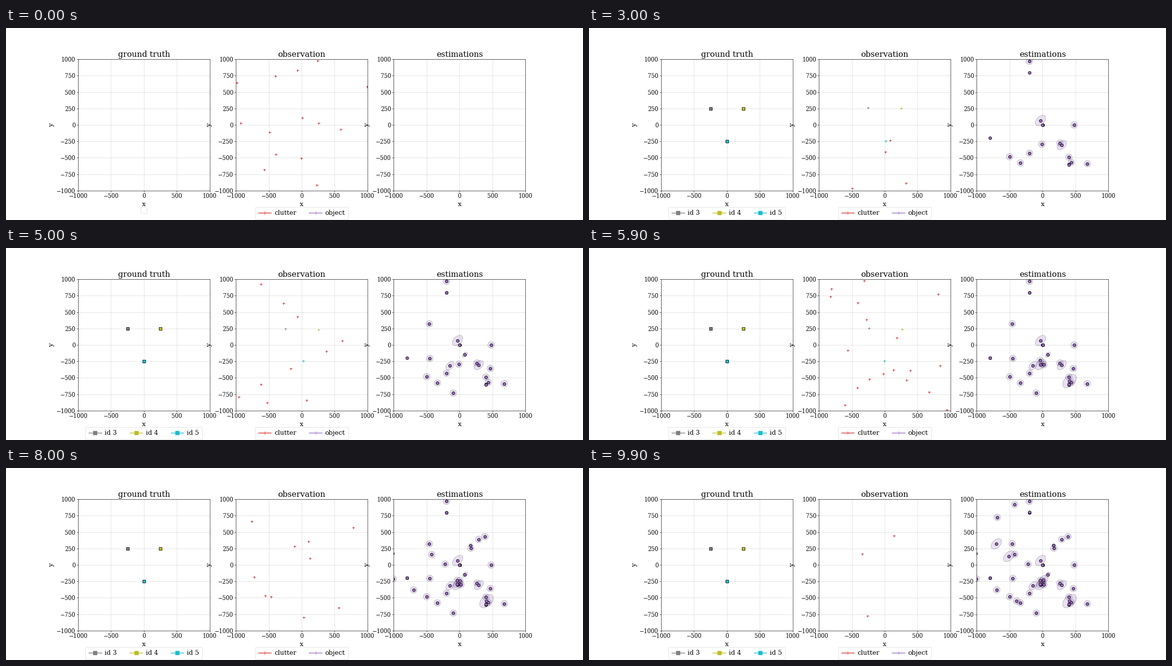
Write a matplotlib script that moves like this. It is 1200 by 400 pixels and loops after 10 s.

```python
import numpy as np
import matplotlib.pyplot as plt
from matplotlib.animation import FuncAnimation
from matplotlib.lines import Line2D
from matplotlib.patches import Ellipse

STEPS = 100
BORN, LOST = 1, 70          # first step with objects, first step without detections
RED, PURPLE = "#d62728", "#9467bd"
OBJECTS = [("id 3", "#7f7f7f", (-250, 250)),
           ("id 4", "#bcbd22", (250, 250)),
           ("id 5", "#17becf", (0, -250))]

# Estimates in order of arrival: equal circles, then ellipses tilted by
# 45 degrees with the length of their long axis.
ROUND = [(-200, 970), (265, -275), (400, -490), (437, -570), (680, -590),
         (-10, -293), (-198, -430), (480, 0), (-500, -483), (-337, -578),
         (-95, -732),
         (-460, 322), (-452, -205), (468, -358), (-35, -235), (20, -300),
         (172, 255), (290, 390), (388, 433), (-423, 160), (-220, 14),
         (-697, -380), (-1008, -212), (5, -240),
         (-423, 920), (-688, 725), (-395, -548)]
TILTED = [(-30, 68, 190), (293, -307, 170),
          (82, -148, 95), (-145, -316, 155), (-30, -300, 190), (410, -550, 250),
          (-35, -290, 130), (-703, 322, 190), (-512, 132, 200), (15, -225, 170)]
# Sharp estimates that keep coming back: first step, x, y.
SHARP = [(1, 0, 0), (2, 400, -600), (21, -200, 800), (26, -800, -200),
         (61, 168, 300), (74, -1017, 175)]

plt.rcParams.update({
    "font.family": "DejaVu Serif", "font.size": 10,
    "axes.titlesize": 12, "axes.titlepad": 4,
    "axes.labelsize": 9.6, "axes.labelpad": 3,
    "xtick.labelsize": 8.4, "ytick.labelsize": 8.4,
    "axes.linewidth": 0.5, "patch.linewidth": 0.5, "legend.fontsize": 9.6,
    "legend.borderpad": 0.5, "legend.handletextpad": 0.5,
})

rng = np.random.default_rng(7)


def observe():
    clutter = rng.uniform(-1000, 1000, (rng.poisson(11), 2))
    found = [rng.normal(pos, 10) for _, _, pos in OBJECTS]
    return clutter, found


scans = [observe() for _ in range(STEPS)]

fig, axes = plt.subplots(1, 3, figsize=(12, 4), dpi=100)
truth_ax, scan_ax, est_ax = axes
for ax, title in zip(axes, ("ground truth", "observation", "estimations")):
    ax.set(title=title, xlabel="x", ylabel="y", aspect="equal",
           xlim=(-1000, 1000), ylim=(-1000, 1000))
    ax.set_xticks(range(-1000, 1001, 500))
    ax.set_yticks(range(-1000, 1001, 250))
    ax.tick_params(length=2, width=0.5, pad=2)
    ax.grid(color="#b0b0b0", lw=0.5, alpha=0.5)
    ax.set_axisbelow(True)


def add_legend(ax, handles):
    return ax.legend(handles=handles, loc="upper center", ncol=3,
                     bbox_to_anchor=(0.5, -0.1))


def key(label, color, marker):
    return Line2D([], [], color=color, lw=1, marker=marker, ms=5.6,
                  mew=0.5, label=label)


no_ids = add_legend(truth_ax, [])
all_ids = add_legend(truth_ax, [key(n, c, "s") for n, c, _ in OBJECTS])
truth_ax.add_artist(no_ids)
add_legend(scan_ax, [key("clutter", RED, "+"), key("object", PURPLE, "+")])

squares = [truth_ax.plot(*pos, "s", color=c, ms=4.4, mec="black", mew=0.6)[0]
           for _, c, pos in OBJECTS]


def cross(color):
    return scan_ax.plot([], [], "+", color=color, ms=3.6, mew=0.8)[0]


clutter_marks = cross(RED)
object_marks = [cross(c) for _, c, _ in OBJECTS]

estimates = []              # (first step, artist)


def add_dot(step, x, y):
    dot, = est_ax.plot(x, y, "o", color=PURPLE, ms=4.4, mec="black", mew=0.6)
    estimates.append((step, dot))


def add_estimate(step, x, y, length, width):
    area = Ellipse((x, y), length, width, angle=45, facecolor=PURPLE,
                   edgecolor="black", lw=0.8, alpha=0.2)
    estimates.append((step, est_ax.add_patch(area)))
    add_dot(step, x, y)


# Arrivals speed up and slow down over the loop.
for i, (x, y) in enumerate(ROUND):
    step = np.interp(i, (0, 5, 10, 11, 16, 24, 27), (2, 18, 31, 41, 60, 81, 100))
    add_estimate(step, x, y, 100, 100)
for i, (x, y, length) in enumerate(TILTED):
    step = np.interp(i, (0, 1, 2, 6, 7, 10), (3, 10, 41, 60, 81, 100))
    add_estimate(step, x, y, length, 0.62 * length)
for first, x, y in SHARP:
    for step in range(first, STEPS, 25):
        add_dot(step, *rng.normal((x, y), 2))


def draw(step):
    clutter, found = scans[step]
    clutter_marks.set_data(*clutter.T)
    for mark, (x, y) in zip(object_marks, found):
        mark.set_data([x], [y])
        mark.set_visible(BORN <= step < LOST)
    alive = step >= BORN
    no_ids.set_visible(not alive)
    for artist in (all_ids, *squares):
        artist.set_visible(alive)
    for first, artist in estimates:
        artist.set_visible(step >= first)
    return []


anim = FuncAnimation(fig, draw, frames=STEPS, interval=100, repeat=True,
                     repeat_delay=0, init_func=lambda: draw(0))
plt.show()
```
